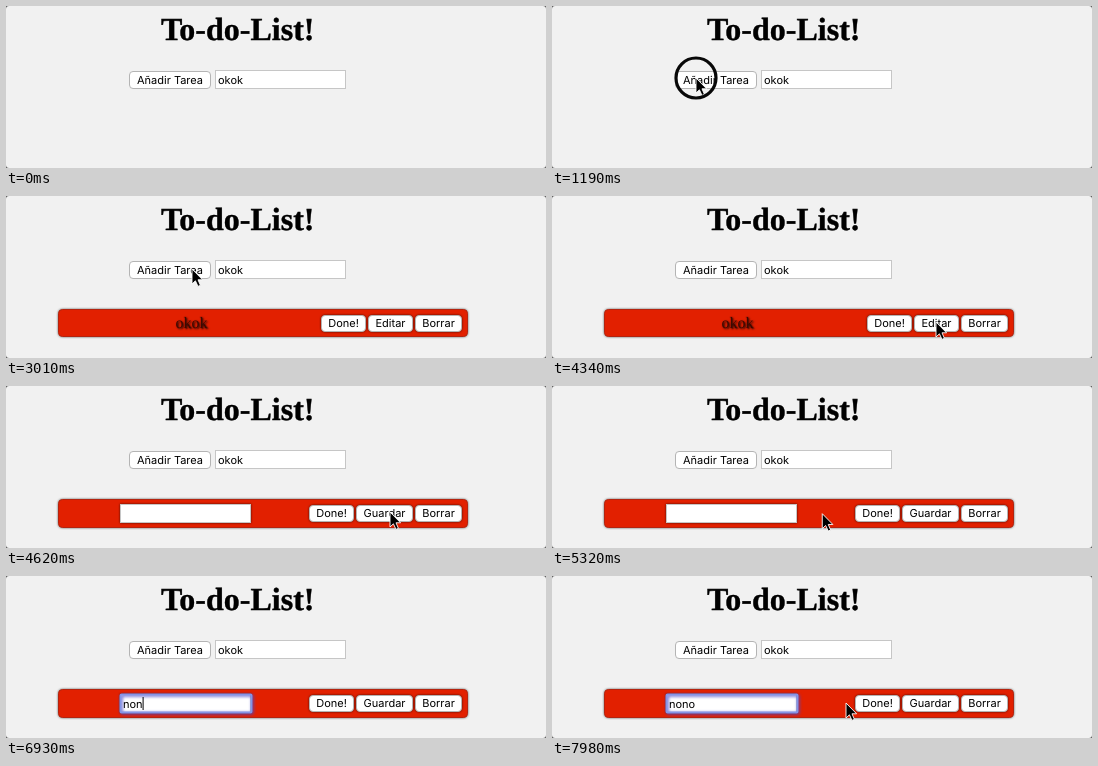
These frames come from a looping animation (540x162 px, 8 s). An HTML page:

```html
<!DOCTYPE html>
<html lang="es">
<head>
<meta charset="utf-8">
<title>To-do-List</title>
<style>
  html, body { margin: 0; width: 100%; height: 100%; overflow: hidden; background: #555; }
  svg { display: block; }
  text { font: 11px Inter, sans-serif; text-rendering: geometricPrecision; }
  .title { font: bold 32px "Liberation Serif", serif; stroke: #000; stroke-width: .4; }
  .task { font: 16px "Liberation Serif", serif; fill: #3b0a02; text-shadow: 1px 1px 2px #000; }
  .btn rect { fill: #fff; stroke: #b4b4b4; }
  .btn text { text-anchor: middle; }
  .pressed rect { fill: url(#blue); stroke: #3a68c8; }
  .field { fill: #fff; stroke: #c6c6c6; }
  #bar { fill: #e22000; stroke: #b32410; filter: drop-shadow(0 0 .8px #0009); }
  #item .btn rect, #item .field { filter: drop-shadow(0 0 1px #000a); }
  #focus { fill: none; stroke: #8494e6; stroke-width: 2; filter: drop-shadow(1px 1px 1.5px #4a48c8); }
</style>
</head>
<body>
<svg id="stage" width="540" height="162" viewBox="0 0 540 162"></svg>
<script>
const LOOP = 8000, STEP = 70;

const button = (id, x, y, w, h, label) => `<g id="${id}" class="btn">
  <rect x="${x + .5}" y="${y + .5}" width="${w - 1}" height="${h - 1}" rx="3.5"/>
  <text x="${x + w / 2}" y="${y + h / 2 + 3.6}">${label}</text></g>`;
const itemButton = (id, right, w, label) => button(id, right - w, 119, w, 17, label);
const field = (x, y) =>
  `<rect class="field" x="${x + .5}" y="${y + .5}" width="130" height="18"/>`;

document.getElementById('stage').innerHTML = `
  <defs><linearGradient id="blue" x2="0" y2="1">
    <stop stop-color="#6ca4f8"/><stop offset="1" stop-color="#2862df"/>
  </linearGradient></defs>
  <rect width="540" height="162" rx="3" fill="#f1f1f1"/>
  <text class="title" x="231.7" y="34" text-anchor="middle">To-do-List!</text>
  ${button('add', 123, 65, 82, 18, 'Añadir Tarea')}
  ${field(209, 64)}
  <text x="212" y="78">okok</text>
  <g id="item">
    <rect id="bar" x="52.5" y="113.5" width="409" rx="4"/>
    <g id="view">
      <text class="task" x="185.5" y="132" text-anchor="middle">okok</text>
      ${itemButton('done', 360, 45, 'Done!')}
      ${itemButton('edit', 407, 45, 'Editar')}
    </g>
    <g id="editor">
      ${field(114, 118)}
      <rect id="focus" x="114.5" y="118.5" width="131" height="18" rx="1"/>
      <text id="typed" x="117" y="132"></text>
      <rect id="caret" y="121" width="1" height="13"/>
      ${itemButton('done2', 348, 45, 'Done!')}
      ${itemButton('save', 407, 57, 'Guardar')}
    </g>
    ${itemButton('remove', 456, 47, 'Borrar')}
  </g>
  <g id="pointer">
    <path id="arrow" d="M0 0V15L3.4 11.8L6 17.4L8.4 16.3L6 10.8H10.6Z" stroke="#fff" stroke-width=".9"/>
    <path id="beam" d="M-3-9Q0-9 0-7V8Q0 10 3 10M3-9Q0-9 0-7M0 8Q0 10-3 10M-2 3H2" fill="none" stroke="#222"/>
    <g id="ring" fill="none">
      <circle id="halo" stroke="#fff" stroke-width="1.2"/>
      <circle id="band" stroke="#080808" stroke-width="3.2"/>
    </g>
  </g>`;

const el = Object.fromEntries([...document.querySelectorAll('[id]')].map(e => [e.id, e]));
const show = (e, on) => e.style.display = on ? '' : 'none';

const entry = { x: 277, y: 172 };
const moves = [
  { from: 350, to: 560, x: 144, y: 72 },
  { from: 2730, to: 3010, x: 186, y: 73 },
  { from: 3150, to: 3360, x: 372, y: 114 },
  { from: 3500, to: 3920, x: 384, y: 126 },
  { from: 4830, to: 5740, x: 180, y: 129 },
  { from: 7490, to: 7980, x: 294, y: 127 }
];
const within = (t, [from, to]) => t >= from && t < to;
const clicks = { activate: [1190, 1330], add: [2310, 2450], edit: [4410, 4550], focus: [5880, 5950] };
const typing = { word: 'nono', from: 6300, every: 280 };

const ease = u => u * u * (3 - 2 * u);
const clamp = u => Math.min(1, Math.max(0, u));

function pointerAt(t) {
  return moves.reduce((p, m) => {
    const k = ease(clamp((t - m.from) / (m.to - m.from)));
    return { x: p.x + (m.x - p.x) * k, y: p.y + (m.y - p.y) * k };
  }, entry);
}

function draw(time) {
  const t = Math.floor(time % LOOP / STEP) * STEP;
  const editing = t >= clicks.edit[1], focused = t >= clicks.focus[0];
  const leaving = t > moves.at(-1).from;

  show(el.item, t >= clicks.add[1]);
  show(el.view, !editing);
  show(el.editor, editing);
  show(el.focus, focused);
  el.bar.setAttribute('height', editing ? 28 : 27);
  el.add.classList.toggle('pressed', within(t, clicks.add));
  el.edit.classList.toggle('pressed', within(t, clicks.edit));

  const count = Math.max(0, Math.floor((t - typing.from) / typing.every) + 1);
  el.typed.textContent = typing.word.slice(0, count);
  show(el.caret, focused && !leaving);
  el.caret.setAttribute('x', 117 + el.typed.getComputedTextLength());

  const { x, y } = pointerAt(t);
  const overField = editing && x > 114 && x < 246;
  show(el.pointer, t > moves[0].from && (t < typing.from || leaving));
  show(el.arrow, !overField);
  show(el.beam, overField);
  el.pointer.setAttribute('transform', `translate(${x} ${y})`);

  const radius = overField ? 17 : 22;
  show(el.ring, Object.values(clicks).some(c => within(t, c)));
  show(el.halo, overField);
  el.band.setAttribute('r', radius - 2);
  el.halo.setAttribute('r', radius);
}

const start = performance.now();
(function tick() {
  draw(performance.now() - start);
  requestAnimationFrame(tick);
})();
</script>
</body>
</html>
```
